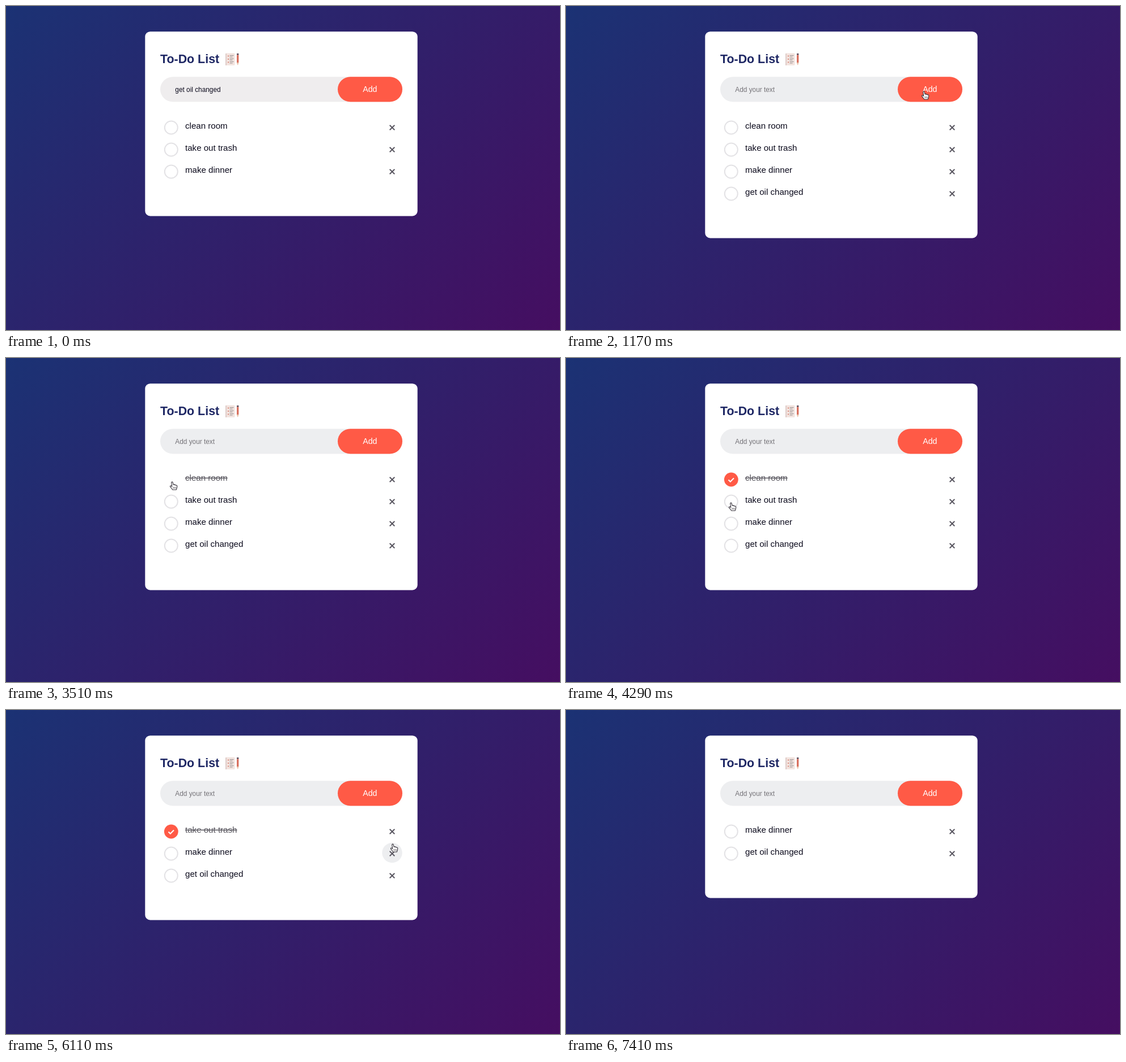
Recreate the animation shown at these times as an HTML page. Size 977 by 573 pixels, loop 8320 ms.

```html
<!DOCTYPE html>
<html lang="en">
<head>
<meta charset="utf-8">
<title>To-Do List</title>
<style>
  html, body { margin: 0; width: 100%; height: 100%; overflow: hidden; }
  body { background: linear-gradient(135deg, #1b3274, #450e61); }
  svg { display: block; width: 977px; height: 573px; font-family: "Liberation Sans", Arial, sans-serif; }
  .title { font-size: 21.4px; font-weight: bold; fill: #1e2764; }
  .field { font-size: 11.85px; }
  .add { font-size: 14.2px; fill: #fff; }
  .item { font-size: 15.1px; fill: #0b0a1c; }
  .done { fill: #58565e; text-decoration: line-through; }
  .line { fill: none; stroke-width: 2; }
</style>
</head>
<body>
<svg viewBox="0 0 977 573">
  <rect id="card" x="245.3" y="45.2" width="480.4" rx="9" fill="#fff"/>
  <text class="title" x="272" y="101.4">To-Do List</text>
  <g id="notepad">
    <rect x="387.5" y="83.5" width="16" height="21.5" rx="1.5" fill="#f3e4df"/>
    <path d="M388 84V105" stroke="#d9c5c1" stroke-width="1.6"/>
    <path d="M391 88.500h2M391 94h2M391 99.500h2" stroke="#d98a7d" stroke-width="1.8"/>
    <path d="M394.500 87.500h7M394.500 90h5M394.500 93h7M394.500 95.500h5M394.500 98.500h7M394.500 101h5" stroke="#8b8587" stroke-width=".9"/>
    <path d="M407 86.500h3.400V100l-1.700 4.500-1.700-4.500z" fill="#d9705f"/>
    <path d="M407 84h3.400v2.500H407z" fill="#5b4a58"/>
    <path d="M407 100h3.400l-1.700 4.500z" fill="#e9c9ae"/>
  </g>
  <rect id="input" x="272" y="125.200" width="427" height="44.300" rx="22.150"/>
  <text id="field" class="field" x="298.300" y="152"></text>
  <rect x="585" y="125.200" width="114" height="44.300" rx="22.150" fill="#ff5a46"/>
  <text class="add" x="641.800" y="152" text-anchor="middle">Add</text>
  <g id="rows"></g>
  <g id="hand">
    <path d="M-1.300 1Q0-.8 1.200 1L2 5Q3.300 4 4.300 5.400 5.800 4.600 6.500 6.200 8.600 5.600 8.800 7.700L8.300 10.800 7.200 14H.7L-1.600 10.800-3.600 8.200Q-3.400 6.300-1.300 7.300L-.3 8.400Z"
      fill="#fff" stroke="#343039" stroke-width="1.100" stroke-linejoin="round"/>
    <path d="M2 9v3M4 9v3M6 9v3" stroke="#343039" stroke-width=".7"/>
  </g>
</svg>
<script>
const LOOP = 8320, STEP = 130;
const ADDED = 910, CHECK_1 = 3510, CHECK_2 = 4420, DELETE_1 = 5850, DELETE_2 = 6630;
const $ = id => document.getElementById(id);

const tasks = [
  { name: "clean room", from: 0, check: CHECK_1, to: DELETE_1 },
  { name: "take out trash", from: 0, check: CHECK_2, to: DELETE_2 },
  { name: "make dinner", from: 0, check: LOOP, to: LOOP },
  { name: "get oil changed", from: ADDED, check: LOOP, to: LOOP }
];

// Pointer stops: time, x, y of the fingertip
const path = [
  [520, 650, 190], [910, 631, 151], [1430, 631, 151], [2210, 235, 215],
  [2600, 307, 213], [3250, 293, 219], [3900, 293, 219], [4290, 291, 256],
  [4420, 291, 256], [4810, 694, 246], [4940, 694, 246], [5200, 692, 246],
  [5590, 682, 214], [5850, 682, 214], [6110, 682, 237], [6370, 682, 214],
  [6760, 682, 214], [7280, 685, 300]
];

function pointer(t) {
  const i = path.findIndex(p => p[0] > t);
  if (i < 1) return null;
  const [t0, x0, y0] = path[i - 1], [t1, x1, y1] = path[i];
  const u = (t - t0) / (t1 - t0), k = u * u * (3 - 2 * u);
  return [x0 + (x1 - x0) * k, y0 + (y1 - y0) * k];
}

function row(task, i, t, tip) {
  const y = 215 + 39 * i, done = t >= task.check;
  const hover = tip && Math.hypot(tip[0] - 681, tip[1] - y + 1.5) < 17.7;
  let mark = `<circle class="line" cx="291.3" cy="${y}" r="11.5" stroke="#e3e2e5"/>`;
  // The checked badge shows one step after the text is struck out
  if (done) mark = t < task.check + STEP ? "" :
    `<circle cx="291.3" cy="${y}" r="12.4" fill="#ff5a46"/>
     <path class="line" d="M286.5 ${y + .5}l3.300 3.300 6.200-6.300" stroke="#fff"/>`;
  return `${mark}
    <text class="item ${done ? "done" : ""}" x="316" y="${y + 2}">${task.name}</text>
    ${hover ? `<circle cx="681" cy="${y - 1.5}" r="17.700" fill="#edeef0"/>` : ""}
    <path class="line" d="M676.700 ${y - 4.3}l8.600 8.600m0-8.600l-8.600 8.600" stroke="#5b5862"/>`;
}

function draw(t) {
  const tip = pointer(t), typed = t < ADDED;
  const list = tasks.filter(k => t >= k.from && t < k.to);
  $("card").setAttribute("height", 209.2 + 39 * list.length);
  $("input").setAttribute("fill", typed ? "#efedee" : "#edeef0");
  $("field").textContent = typed ? "get oil changed" : "Add your text";
  $("field").setAttribute("fill", typed ? "#0b0a1c" : "#757378");
  $("rows").innerHTML = list.map((k, i) => row(k, i, t, tip)).join("");
  $("hand").setAttribute("visibility", tip ? "visible" : "hidden");
  if (tip) $("hand").setAttribute("transform", `translate(${tip})`);
}

const start = performance.now();
let last = -1;
function tick() {
  const t = Math.floor((performance.now() - start) % LOOP / STEP) * STEP;
  if (t !== last) draw(last = t);
  requestAnimationFrame(tick);
}
tick();
</script>
</body>
</html>
```
